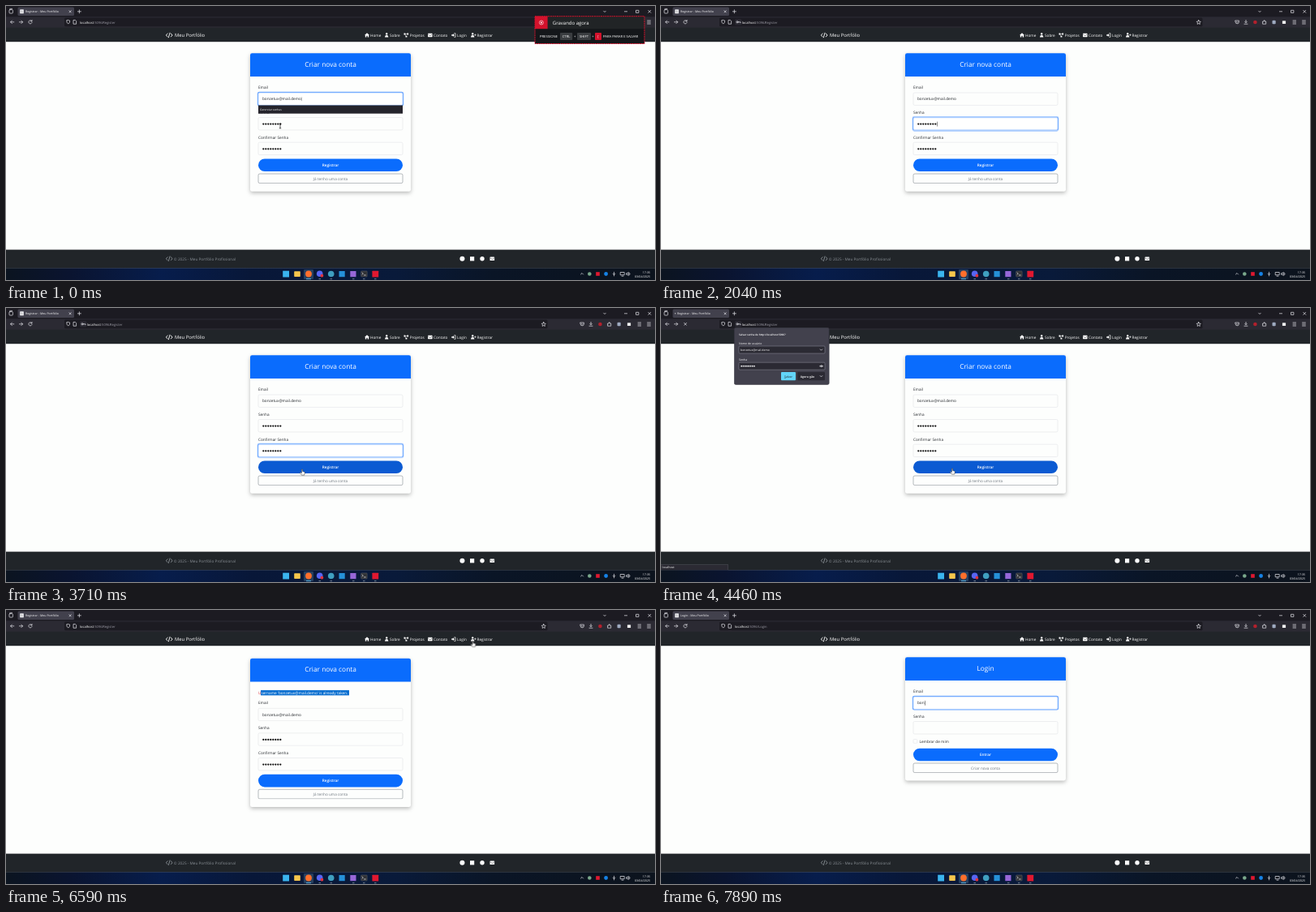
Write an HTML page that moves like this. It is 800 px wide and 338 px high and loops after 7990 ms.

```html
<!DOCTYPE html>
<html lang="pt-BR">
<head>
<meta charset="utf-8">
<title>Meu Portfólio</title>
<style>
@property --n { syntax: '<integer>'; inherits: true; initial-value: 0; }
html, body { margin: 0; height: 100%; overflow: hidden; background: #fdfefd; }
svg.stage { display: block; width: 100%; height: 100%; }
text { font: 4.7px "Open Sans", "Noto Sans", sans-serif; fill: #212529; text-rendering: geometricPrecision; white-space: pre; }
.w { fill: #fff; } .mid { text-anchor: middle; } .end { text-anchor: end; }
.brand { font-size: 5.85px; } .title { font-size: 8.35px; }
.bold { font-weight: 600; } .s { font-size: 3.6px; } .url { font-size: 4.1px; } .xs { font-size: 3.3px; }
.grey { fill: #8b9197; } .dim { fill: #9a99a3; } .muted { fill: #6c757d; }
.key { font-size: 4.2px; }
.line { fill: none; stroke: #e8e8ee; stroke-width: .7; stroke-linecap: round; stroke-linejoin: round; }
.field { fill: #fdfefd; stroke: #dcdfe3; stroke-width: .5; }
.focus { fill: #fff; stroke: #86b7fe; stroke-width: .5; }
.halo { fill: #72aaff; }
.card { fill: #fdfefd; filter: drop-shadow(0 2.2px 2.6px #0004); }
.blue { fill: #0a6cfd; }
.outline { fill: none; stroke: #6c757d; stroke-width: .5; }

/* every animation shares one clock; "on" parts switch hard */
.a { animation: 7990ms infinite linear; }
.on { animation: 7990ms infinite step-end; }
.toast { animation-name: toast; } .emailFocus { animation-name: emailFocus; }
.passFocus { animation-name: passFocus; } .confFocus { animation-name: confFocus; }
.pass { animation-name: pass; } .conf { animation-name: conf; }
.blink { animation: blink 1060ms infinite step-end; }
.reg { animation-name: reg; } .login { animation-name: login; } .error { animation-name: error; }
.drop { animation-name: drop; } .tall { animation-name: tall; } .lift { animation-name: lift; }
.hover { animation-name: hover; } .load { animation-name: load; } .idle { animation-name: idle; }
.shift { animation-name: shift; } .lock { animation-name: lock; } .tabText { animation-name: tabText; }
.save { animation-name: save; } .select { animation-name: select; }
.loginFocus { animation-name: loginFocus; } .typed { animation-name: typed; }
.mouse { animation-name: mouse; } .seen { animation-name: seen; }
.beam { animation-name: beam; } .hand { animation-name: hand; } .arrow { animation-name: arrow; }
.fill { width: calc(var(--n) * 3px); }
.caret { fill: #111; transform: translateX(calc(var(--n) * 3px)); }

@keyframes toast { 0% { opacity: 1 } 23.28%, 100% { opacity: 0 } }
@keyframes emailFocus { 0% { opacity: 1 } 2.38%, 100% { opacity: 0 } }
@keyframes passFocus { 0% { opacity: 0 } 2.38% { opacity: 1 } 26.66%, 100% { opacity: 0 } }
@keyframes confFocus { 0% { opacity: 0 } 26.66% { opacity: 1 } 47.7%, 100% { opacity: 0 } }
@keyframes pass { 0%, 8.64% { --n: 0 } 21.53%, 58.06% { --n: 8 } 58.07%, 100% { --n: 0 } }
@keyframes conf { 0%, 27.3% { --n: 0 } 37.4%, 58.06% { --n: 8 } 58.07%, 100% { --n: 0 } }
@keyframes blink { 0% { opacity: 1 } 50% { opacity: 0 } }
@keyframes reg { 0% { opacity: 1 } 87.1%, 100% { opacity: 0 } }
@keyframes login { 0% { opacity: 0 } 87.1%, 100% { opacity: 1 } }
@keyframes error { 0% { opacity: 0 } 58.07%, 100% { opacity: 1 } }
@keyframes drop { 0% { transform: none } 58.07%, 100% { transform: translateY(12.8px) } }
@keyframes tall { 0% { height: 170.6px } 58.07%, 100% { height: 183.4px } }
@keyframes lift {
  0%, 59% { transform: translateY(0) } 62%, 72.5% { transform: translateY(1.5px) }
  76%, 78.5% { transform: translateY(0) } 81.5%, 90% { transform: translateY(1.5px) }
  93%, 100% { transform: translateY(0) }
}
@keyframes hover { 0%, 41.3% { fill: #0a6cfd } 43%, 58.06% { fill: #0b5ad2 } 58.08%, 100% { fill: #0a6cfd } }
@keyframes load { 0% { opacity: 0 } 48.8% { opacity: 1 } 58.07%, 100% { opacity: 0 } }
@keyframes idle { 0% { opacity: 1 } 48.8% { opacity: 0 } 58.07%, 100% { opacity: 1 } }
@keyframes tabText { 0% { transform: none } 48.8% { transform: translateX(-4px) } 58.07%, 100% { transform: none } }
@keyframes lock { 0% { opacity: 0 } 9.26% { opacity: 1 } 63.95%, 100% { opacity: 0 } }
@keyframes shift { 0% { transform: none } 9.26% { transform: translateX(8.8px) } 63.95%, 100% { transform: none } }
@keyframes save { 0% { opacity: 0 } 52.3% { opacity: 1 } 63.95%, 100% { opacity: 0 } }
@keyframes select { 0%, 73.2% { width: 0 } 77.85%, 100% { width: 109px } }
@keyframes loginFocus { 0% { opacity: 0 } 93%, 100% { opacity: 1 } }
@keyframes typed { 0% { --n: 0 } 96.4% { --n: 1 } 97.5% { --n: 2 } 98.6%, 100% { --n: 3 } }
@keyframes mouse {
  0%, 37.17% { transform: translate(338px, 148px) }
  42.9%, 46.4% { transform: translate(365px, 199px) }
  55.8%, 58.07% { transform: translate(359px, 198px) }
  62.8%, 68.6% { transform: translate(175.4px, 85.4px) }
  73.2% { transform: translate(314px, 102px) }
  77.85% { transform: translate(423px, 102px) }
  82.4%, 82.8% { transform: translate(575.5px, 38.3px) }
  84.7%, 87.1% { transform: translate(559px, 36px) }
  92%, 100% { transform: translate(360px, 115px) }
}
@keyframes seen { 0% { opacity: 1 } 9.26% { opacity: 0 } 37.17% { opacity: 1 } 96.4%, 100% { opacity: 0 } }
@keyframes beam { 0% { opacity: 1 } 41.3% { opacity: 0 } 72.5% { opacity: 1 } 78.5% { opacity: 0 } 91.5%, 100% { opacity: 1 } }
@keyframes hand { 0% { opacity: 0 } 41.3% { opacity: 1 } 58.8% { opacity: 0 } 81.9% { opacity: 1 } 87.6%, 100% { opacity: 0 } }
@keyframes arrow { 0% { opacity: 0 } 58.8% { opacity: 1 } 72.5% { opacity: 0 } 78.5% { opacity: 1 } 81.9% { opacity: 0 } 87.6% { opacity: 1 } 91.5%, 100% { opacity: 0 } }
</style>
</head>
<body>
<svg class="stage" viewBox="0 0 800 338">
<defs>
  <linearGradient id="bar">
    <stop offset="0" stop-color="#0b1420"/><stop offset=".1" stop-color="#0a1430"/>
    <stop offset=".24" stop-color="#071d4c"/><stop offset=".38" stop-color="#081738"/>
    <stop offset=".6" stop-color="#091a3a"/><stop offset=".75" stop-color="#0a1526"/>
    <stop offset="1" stop-color="#0c131d"/>
  </linearGradient>
  <rect id="box" x="311" width="178" height="15.4" rx="1.6"/>
  <rect id="pill" x="311" width="178" height="15.6" rx="7.8"/>
  <rect id="flat" x="311" width="178" height="11.6" rx="1.8"/>
  <g id="ring">
    <rect class="halo" x="309.8" y="-1.2" width="180.4" height="17.8" rx="2.4"/>
    <use href="#box" class="focus"/>
  </g>
  <g id="dots"><path d="M1.3 0H23" fill="none" stroke="#111" stroke-width="2.3" stroke-linecap="round" stroke-dasharray="0 3"/></g>
  <path id="code" d="M2-1.9 0 0l2 1.9M6-1.9 8 0 6 1.9M4.8-2.8 3.2 2.8" fill="none" stroke-width=".9" stroke-linecap="round" stroke-linejoin="round"/>
  <g id="mail"><rect width="5.6" height="4.4" rx=".6"/><path d="M.1 1.1 2.8 2.9 5.5 1.1" fill="none" stroke="#212529" stroke-width=".5"/></g>
  <path id="user" d="M2.2 0a1.25 1.25 0 1 1 .01 0zM0 2.9q0-2.4 2.2-2.4t2.2 2.4z"/>
  <path id="chev" d="M-1.3-.6 0 .7 1.3-.6" class="line"/>
  <clipPath id="passClip"><rect class="fill" y="-3" height="6"/></clipPath>
  <clipPath id="confClip"><rect class="fill" y="-3" height="6"/></clipPath>
  <clipPath id="selClip"><rect class="a select" x="314" y="97" width="0" height="9"/></clipPath>
</defs>

<!-- browser chrome -->
<rect width="800" height="27" fill="#2b2a33"/>
<rect width="800" height="13.3" fill="#1c1b22"/>
<rect x="14.5" y="1.5" width="69.5" height="10.5" rx="1.5" fill="#42414d"/>
<g class="line"><rect x="4" y="4.6" width="4.4" height="4.4" rx=".9"/><path d="M4.8 3.4H7.6M78 5.7l2.2 2.2M80.2 5.7 78 7.9M88.4 6.8h4M90.4 4.8v4"/></g>
<g class="on idle"><rect x="17.2" y="4.3" width="4.6" height="5" rx=".5" fill="#f0f0f4"/><path d="M18 6h2.4M18 7.4h3" stroke="#777" stroke-width=".4"/></g>
<circle class="on load" cx="17.6" cy="6.8" r=".7" fill="#bbb"/>
<g class="on tabText"><text class="on reg s w" x="24" y="8.2">Registrar - Meu Portfólio</text></g>
<text class="on login s w" x="24" y="8.2">Login - Meu Portfólio</text>
<use href="#chev" x="738" y="6.8"/>
<path class="line" d="M762.4 6.8h3.2M776.9 5.3h3v3h-3zM791.8 5.3l3 3M794.8 5.3l-3 3"/>
<path class="line" d="M9.8 19.8H5.6M7.4 18 5.6 19.8l1.8 1.8M16.4 19.8h4.2M18.8 18l1.8 1.8-1.8 1.8"/>
<path class="line on idle" d="M31.7 18.5a2.1 2.1 0 1 0 .4 1.6M32 17.3v1.5h-1.5"/>
<path class="line on load" d="M28.5 18.3l3 3M31.5 18.3l-3 3"/>
<rect x="72" y="14.6" width="595.5" height="10.6" rx="1.5" fill="#1c1b22"/>
<path class="line" stroke-width=".5" d="M76.7 17.4l2 .7q0 3-2 4-2-1-2-4zM83.4 17.4h2.1l1.1 1.1v3.7h-3.2z"/>
<g class="on lock">
  <rect x="91.2" y="16.2" width="8" height="7.4" rx="1" fill="#2b2a33"/>
  <circle class="line" cx="94" cy="19.8" r="1.1"/><path class="line" d="M95.2 19.8h2.8v.9"/>
</g>
<g class="on shift">
  <text class="url w" x="91" y="21.5">localhost<tspan class="dim on reg">:5096/</tspan></text>
  <text class="url dim on reg" x="119.2" y="21.5">Register</text>
</g>
<text class="url dim on login" x="108.1" y="21.5">:5096/Login</text>
<path class="line" d="M662.7 17.4l.8 1.7 1.8.2-1.3 1.3.3 1.8-1.6-.9-1.6.9.3-1.8-1.3-1.3 1.8-.2z"/>
<g class="line">
  <path d="M708 18h4.4v1.6q0 2.2-2.2 2.2T708 19.600zM709.2 19.400l1 1 1-1M721 17.400v3M719.700 19.300l1.300 1.300 1.300-1.300M719 22.200h4M742 19h1.200q-.4-1.500.5-1.500t.5 1.500h1.500v3.200H742zM779 18h3.600M779 20h3.600M779 22h3.600M790.600 18h3.800M790.600 20h3.800M790.600 22h3.800"/>
</g>
<circle cx="732.4" cy="20" r="2.3" fill="#b3202c"/>
<rect x="753.5" y="17.800" width="4.200" height="4.400" rx="1" fill="#9eaac0"/>
<rect x="765.9" y="18.200" width="4.200" height="3.800" rx=".5" fill="#eee"/>

<!-- site header and footer -->
<rect y="26.700" width="800" height="17.500" fill="#212529"/>
<use href="#code" x="197.200" y="36" stroke="#fff"/>
<text class="brand w" x="208" y="38">Meu Portfólio</text>
<g class="w">
  <path d="M442 36l3-2.700 3 2.700h-.8v2.400h-1.500v-1.700h-1.400v1.700h-1.500V36z"/>
  <use href="#user" x="467" y="35.600"/>
  <path d="M490.500 33.600h1.900v1.800h-1.900zM494.200 33.600h1.900v1.800h-1.900zM492.500 36.800h1.900v1.800h-1.900z"/>
  <path d="M492 34.500h2.600M491.700 35l1.500 2.200" stroke="#fff" stroke-width=".5"/>
  <use href="#mail" x="520" y="33.800"/>
  <path d="M549.200 35.300h1.700v-1.200l2 1.900-2 1.900v-1.200h-1.700z"/>
  <path d="M552.400 33.700h1.600v4.600h-1.600" fill="none" stroke="#fff" stroke-width=".7"/>
  <use href="#user" x="573" y="35.600"/><path d="M577.200 35.700h2.400M578.400 34.500v2.400" stroke="#fff" stroke-width=".6"/>
</g>
<text class="w" x="449" y="37.700">Home</text><text class="w" x="473" y="37.700">Sobre</text>
<text class="w" x="497.700" y="37.700">Projetos</text><text class="w" x="527" y="37.700">Contato</text>
<text class="w" x="556" y="37.700">Login</text><text class="w" x="580.500" y="37.700">Registrar</text>
<rect y="300.600" width="800" height="23" fill="#212529"/>
<use href="#code" x="197.200" y="311.700" stroke="#8b9197" stroke-width=".7"/>
<text class="grey" x="206.800" y="313.600">© 2025 - Meu Portfólio Profissional</text>
<g class="w">
  <circle cx="562.400" cy="311.800" r="3"/><rect x="572" y="309.200" width="5.200" height="5.200"/>
  <circle cx="587" cy="311.800" r="2.700"/><use href="#mail" x="596.500" y="309.600"/>
</g>

<!-- registration card -->
<g class="on reg"><g class="a lift">
  <rect class="card on tall" x="301" y="58.200" width="198" height="170.600" rx="2.400"/>
  <path class="blue" d="M301 87V60.600q0-2.400 2.400-2.400h193.200q2.400 0 2.400 2.400V87z"/>
  <text class="title w mid" x="400" y="74.500">Criar nova conta</text>
  <g class="on error">
    <text x="311" y="102.300" style="fill:#e0303f">Username 'bonzetux@mail.demo' is already taken.</text>
    <g clip-path="url(#selClip)">
      <rect x="314" y="97" width="109" height="6.800" fill="#0a6fd0"/>
      <text class="w" x="311" y="102.300">Username 'bonzetux@mail.demo' is already taken.</text>
    </g>
  </g>
  <g class="on drop">
    <text x="311" y="102.200">Email</text>
    <use href="#box" class="field" y="107"/>
    <use href="#ring" y="107" class="on emailFocus"/>
    <text x="316" y="116.400">bonzetux@mail.demo<tspan class="on emailFocus" dx="-.3">|</tspan></text>
    <text x="311" y="132.800">Senha</text>
    <use href="#box" class="field" y="137.500"/>
    <use href="#ring" y="137.500" class="on passFocus"/>
    <text x="311" y="163.500">Confirmar Senha</text>
    <use href="#box" class="field" y="168.200"/>
    <use href="#ring" y="168.200" class="on confFocus"/>
    <g transform="translate(316 145.600)"><g class="a pass">
      <svg class="fill" y="-2" height="4"><use href="#dots" y="2"/></svg>
      <g class="on passFocus"><rect class="caret" x=".3" y="-2.800" width=".5" height="5.600"/></g>
    </g></g>
    <g transform="translate(316 176.300)"><g class="a conf">
      <svg class="fill" y="-2" height="4"><use href="#dots" y="2"/></svg>
      <g class="on confFocus"><g class="blink"><rect class="caret" x=".3" y="-2.800" width=".5" height="5.600"/></g></g>
    </g></g>
    <use href="#pill" class="a hover" y="188.500" fill="#0a6cfd"/>
    <text class="bold w mid" x="400" y="198.100">Registrar</text>
    <use href="#flat" class="outline" y="207"/>
    <text class="muted mid" x="400" y="214.500">Já tenho uma conta</text>
    <g class="on emailFocus">
      <rect x="311" y="122.500" width="178" height="10.200" fill="#25242c"/>
      <text class="xs w" x="313" y="128.900">Gerenciar senhas</text>
    </g>
  </g>
</g></g>

<!-- login card -->
<g class="on login"><g class="a lift">
  <rect class="card" x="301" y="58.200" width="198" height="152.300" rx="2.400"/>
  <path class="blue" d="M301 87V60.600q0-2.400 2.400-2.400h193.200q2.400 0 2.400 2.400V87z"/>
  <text class="title w mid" x="400" y="74.500">Login</text>
  <text x="311" y="102.200">Email</text>
  <use href="#box" class="field" y="107"/>
  <use href="#ring" y="107" class="on loginFocus"/>
  <g transform="translate(316 114.800)"><g class="on typed">
    <svg class="fill" y="-5" height="10"><text y="6.600">bon</text></svg>
    <g class="on loginFocus"><rect class="caret" x=".2" y="-2.800" width=".5" height="5.600"/></g>
  </g></g>
  <text x="311" y="132.800">Senha</text>
  <use href="#box" class="field" y="137.500"/>
  <rect class="field" x="311" y="159.500" width="4.800" height="4.800" rx="1"/>
  <text x="318.500" y="163.600">Lembrar de mim</text>
  <use href="#pill" class="blue" y="170.700"/>
  <text class="bold w mid" x="400" y="180.300">Entrar</text>
  <use href="#flat" class="outline" y="189"/>
  <text class="muted mid" x="400" y="196.600">Criar nova conta</text>
</g></g>

<!-- save password panel and status line -->
<g class="on save">
  <rect x="90.300" y="24.300" width="116.900" height="70.200" rx="2" fill="#42414d" stroke="#33323c" stroke-width=".5"/>
  <text class="bold w" style="font-size:3.150px" x="96" y="33.500">Salvar senha de http://localhost:5096?</text>
  <text class="w" style="font-size:3.500px" x="96" y="45">Nome de usuário</text>
  <text class="w" style="font-size:3.500px" x="96" y="65.300">Senha</text>
  <g fill="#2b2a33" stroke="#8f8f9d" stroke-width=".5">
    <rect x="96" y="47" width="106" height="9" rx="1"/><rect x="96" y="67.200" width="106" height="9" rx="1"/>
  </g>
  <text class="w" style="font-size:3.500px" x="98" y="52.800">bonzetux@mail.demo</text>
  <path d="M99.200 71.700h17" fill="none" stroke="#fff" stroke-width="1.700" stroke-linecap="round" stroke-dasharray="0 2.250"/>
  <use href="#chev" x="197.500" y="51.500"/>
  <path class="line" d="M195.800 71.700q2-2.200 4 0-2 2.200-4 0"/><circle cx="197.800" cy="71.700" r=".6" fill="#fff"/>
  <rect x="148" y="79" width="18" height="10.300" rx="1" fill="#62d5f8"/>
  <text class="s mid" x="157" y="85.500"><tspan text-decoration="underline">S</tspan>alvar</text>
  <rect x="168" y="79" width="34" height="10.300" rx="1" fill="#2b2a33"/>
  <text class="s bold w mid" x="180.500" y="85.500">Agora <tspan text-decoration="underline">n</tspan>ão</text>
  <use href="#chev" x="197.500" y="84.200"/>
</g>
<g class="on load">
  <rect x="-.3" y="316.700" width="82.800" height="6.600" fill="#2b2a33" stroke="#55545f" stroke-width=".5"/>
  <text class="s w" x="1.500" y="321.300">localhost</text>
</g>

<!-- taskbar -->
<rect y="323.300" width="800" height="14.700" fill="url(#bar)"/>
<rect x="367" y="325" width="12" height="12" rx="1.200" fill="#27405f"/>
<rect x="341.200" y="326.700" width="7.800" height="7.800" fill="#3ab4ee"/>
<rect x="355.200" y="327.200" width="7.600" height="6.800" rx=".7" fill="#f6c64c"/>
<circle cx="373" cy="330.500" r="3.900" fill="#ff6f2c"/>
<circle cx="386.700" cy="330.300" r="3.800" fill="#5865f2"/><circle cx="389.400" cy="332.700" r="1.900" fill="#e0343c"/>
<circle cx="400.700" cy="330.500" r="3.800" fill="#3f9fc0"/>
<rect x="410.500" y="327" width="7.200" height="7.200" fill="#2590d8"/>
<rect x="424.300" y="327" width="7.200" height="7.200" fill="#9667d8"/>
<rect x="437.600" y="327" width="7.600" height="7" rx=".8" fill="#303236" stroke="#888" stroke-width=".3"/>
<path class="line" d="M439 329l1.300 1.200-1.300 1.200M441.400 332h2"/>
<rect x="451.400" y="326.700" width="7.800" height="7.800" rx=".6" fill="#e01830"/>
<path d="M370 336.700h6" stroke="#63c6f2" stroke-width=".9"/>
<path d="M385.500 336.700h2.500M399.500 336.700h2.500M427 336.700h2.500M440 336.700h2.500M454 336.700h2.500" stroke="#8e9aa8" stroke-width=".8"/>
<path class="line" d="M708.500 331l1.500-1.500 1.500 1.500"/>
<circle cx="719.300" cy="330.500" r="2.300" fill="#7aa88c"/>
<rect x="727.200" y="328.200" width="4.600" height="4.600" fill="#e01830"/>
<circle cx="739.600" cy="330.500" r="2.400" fill="#1682e6"/>
<path class="line" d="M749.500 328.300v2.300M748 330.500q1.500 2.200 3 0M749.500 331.700v1.200M757.600 328.500h4.600v3.300h-4.600zM759 333.200h2M765 329.700h1l1.300-1.200v4l-1.300-1.200h-1zM768.600 329.200q1.100 1.300 0 2.600"/>
<text class="s w end" x="794" y="329.600">17:35</text>
<text class="s w end" x="794" y="334.700">03/04/2025</text>

<!-- recording notice -->
<g class="on toast">
  <rect x="652" y="12.700" width="135" height="33.800" fill="#14171a"/>
  <rect x="652" y="12.700" width="135" height="15.500" fill="#212426"/>
  <rect x="652" y="12.700" width="15.600" height="15.500" fill="#d3122c"/>
  <circle cx="659.900" cy="20.500" r="2.500" fill="none" stroke="#fff" stroke-width=".6"/><circle cx="659.900" cy="20.500" r="1" fill="#fff"/>
  <rect x="652" y="12.700" width="135" height="33.800" fill="none" stroke="#d3122c" stroke-width="1" stroke-dasharray="2 .7"/>
  <text class="w" style="font-size:6px" x="673.800" y="23">Gravando agora</text>
  <rect x="683" y="33" width="15.200" height="9" rx=".8" fill="#3a3d40"/>
  <rect x="704" y="33" width="17" height="9" rx=".8" fill="#3a3d40"/>
  <rect x="726" y="33" width="8" height="9" rx=".8" fill="#d3122c"/>
  <text class="key w" x="658" y="39">PRESSIONE</text>
  <text class="key w mid" x="690.600" y="39">CTRL</text><text class="key w mid" x="701.100" y="39">+</text>
  <text class="key w mid" x="712.500" y="39">SHIFT</text><text class="key w mid" x="723.500" y="39">+</text>
  <text class="key w mid" x="730" y="39">[</text>
  <text class="key w" x="736" y="39">PARA PARAR E SALVAR</text>
</g>

<!-- pointer -->
<g class="on seen"><g class="a mouse">
  <path class="on beam" d="M-1.200-2.800H1.200M0-2.800V2.800M-1.200 2.800H1.200" fill="none" stroke="#111" stroke-width=".7"/>
  <path class="on hand" d="M-.6 0q.6-.6 1.200 0v2.600l2.300.6q.7.300.5 1.200l-.6 2.700h-3.400l-2-2.700q.2-.9 1.100-.4l.9.700z" fill="#fff" stroke="#111" stroke-width=".45"/>
  <path class="on arrow" d="M0 0v5.600l1.400-1.200 1 2 1-.5-.9-1.900h1.800z" fill="#fff" stroke="#111" stroke-width=".5"/>
</g></g>
</svg>
</body>
</html>
```
